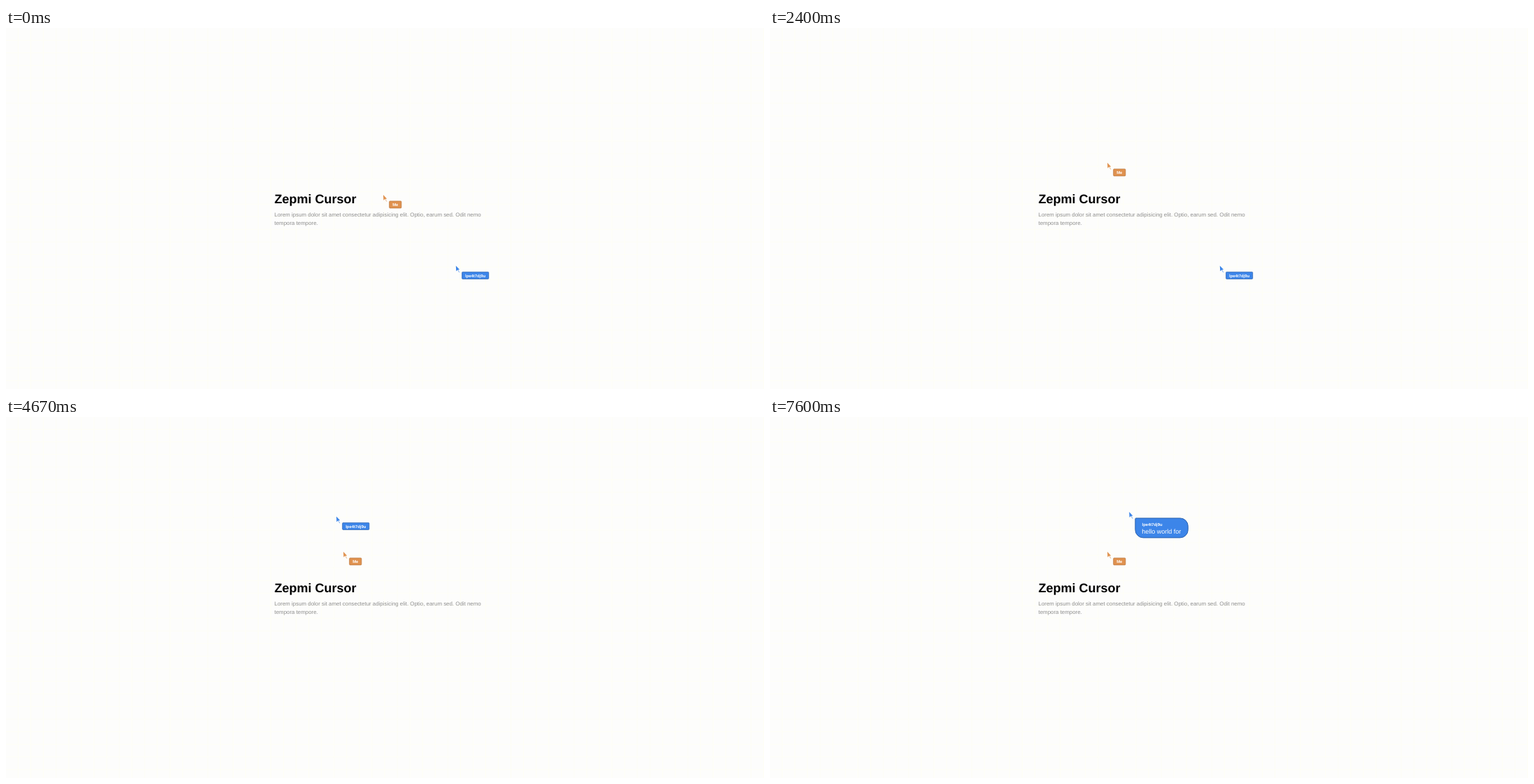
Recreate the animation shown at these times as an HTML page. Size 1083x517 px, loop 8 s.

```html
<!DOCTYPE html>
<html lang="en">
<head>
<meta charset="utf-8">
<title>Shared cursors</title>
<style>
  html, body { margin: 0; width: 100%; height: 100%; overflow: hidden; background: #fdfdfc; }
  svg { display: block; width: 1083px; height: 517px; }
  text { font-family: "Liberation Sans", Arial, sans-serif; text-rendering: geometricPrecision; white-space: pre; }
  .title { font-size: 18px; font-weight: 700; fill: #000; }
  .body { font-size: 7.9px; fill: #8f8f8f; }
  .name { font-size: 5.9px; font-weight: 700; fill: #fff; }
  .msg { font-size: 9.02px; fill: #fff; }
</style>
</head>
<body>
<svg viewBox="0 0 1083 517">
  <defs>
    <pattern id="grid" width="18.05" height="18.05" patternUnits="userSpaceOnUse">
      <path d="M0 17.5H18.05M17.5 0V18.05" stroke="#fefef5" fill="none"/>
    </pattern>
  </defs>
  <rect width="1083" height="517" fill="#fdfdfc"/>
  <rect width="1083" height="517" fill="url(#grid)"/>
  <text class="title" x="383.5" y="251.4">Zepmi Cursor</text>
  <text class="body" x="383.5" y="269.8">Lorem ipsum dolor sit amet consectetur adipisicing elit. Optio, earum sed. Odit nemo</text>
  <text class="body" x="383.5" y="281.6">tempora tempore.</text>
  <g id="cursors"></g>
</svg>
<script>
const LOOP = 8000;
const NS = 'http://www.w3.org/2000/svg';
const OPEN_AT = 5750, OPEN_FOR = 180, KEY_GAP = 85;

const lerp = (a, b, k) => a + (b - a) * k;
const clamp = v => Math.max(0, Math.min(1, v));
const progress = (t, start, end) => clamp((t - start) / (end - start));
const easeOut = (k, power) => 1 - (1 - k) ** power;
const curve = (a, b, c, k) => lerp(lerp(a, b, k), lerp(b, c, k), k);

// A cursor rests at home, then glides along each bend to the next stop.
const me = makeCursor('Me', '#e0924f', '#b87439', {
  home: [539, 239],
  moves: [
    { start: 50, end: 1070, bend: [495, 110], to: [469.5, 184.5] },
    { start: 1070, end: 1430, bend: [473, 192], to: [482, 193] }
  ]
});
const guest = makeCursor('lpe4t7dj9u', '#3c85e9', '#285fae', {
  home: [642.8, 340.5],
  moves: [
    { start: 2800, end: 3430, bend: [603, 190], to: [528, 142.5] },
    { start: 3610, end: 4670, bend: [491.6, 139.6], to: [472, 142.5] },
    { start: 4800, end: 5000, bend: [490, 139], to: [513.2, 136] }
  ]
});
const words = [
  { at: 5870, text: 'hello' },
  { at: 6350, text: ' world' },
  { at: 7330, text: ' for' }
];

function add(parent, tag, attrs) {
  const el = document.createElementNS(NS, tag);
  for (const key in attrs) el.setAttribute(key, attrs[key]);
  return parent.appendChild(el);
}

function makeCursor(label, fill, edge, path) {
  const root = add(document.getElementById('cursors'), 'g', {});
  add(root, 'path', { d: 'M0 0L.4 7.7 2.3 6 5.2 5.4Z', fill });
  add(root, 'path', { d: 'M2.7 5.6L4.9 9.6', stroke: fill, 'stroke-opacity': .65 });
  const tag = add(root, 'g', { transform: 'translate(8.7 8.9)' });
  const box = add(tag, 'path', { fill, stroke: edge });
  const name = add(tag, 'text', { class: 'name' });
  name.textContent = label;
  const msg = add(tag, 'text', { class: 'msg', x: 9.3, y: 22.2 });
  return { root, box, name, msg, path, nameWidth: name.getComputedTextLength() };
}

function place({ home, moves }, t) {
  let from = home;
  for (const { start, end, bend, to } of moves) {
    if (t < start) break;
    const k = easeOut(progress(t, start, end), 2);
    if (k < 1) return from.map((v, i) => curve(v, bend[i], to[i], k));
    from = to;
  }
  return from;
}

// Box with a nearly square top-left corner and radius r elsewhere.
function boxPath(w, h, r) {
  return `M1 0H${w - r}A${r} ${r} 0 0 1 ${w} ${r}V${h - r}A${r} ${r} 0 0 1 ${w - r} ${h}`
    + `H${r}A${r} ${r} 0 0 1 0 ${h - r}V1A1 1 0 0 1 1 0Z`;
}

function drawCursor(c, t, open, message) {
  c.root.setAttribute('transform', `translate(${place(c.path, t)})`);
  if (c.msg.textContent !== message) c.msg.textContent = message;
  const textWidth = Math.max(c.nameWidth, message ? c.msg.getComputedTextLength() : 0);
  const pad = lerp(4.5, 9.6, open);
  c.box.setAttribute('d', boxPath(textWidth + pad * 2, lerp(10, 28, open), lerp(1, 11.3, open)));
  c.box.setAttribute('stroke-width', lerp(.7, 1, open));
  c.name.setAttribute('x', pad);
  c.name.setAttribute('y', lerp(7.2, 11.5, open));
}

function typedAt(t) {
  return words.map(({ at, text }) =>
    text.slice(0, Math.max(0, Math.floor((t - at) / KEY_GAP) + 1))).join('');
}

function render(t) {
  const open = easeOut(progress(t, OPEN_AT, OPEN_AT + OPEN_FOR), 3);
  drawCursor(guest, t, open, typedAt(t));
  drawCursor(me, t, 0, '');
}

const start = performance.now();
function tick(now) {
  render(Math.max(0, now - start) % LOOP);
  requestAnimationFrame(tick);
}
render(0);
requestAnimationFrame(tick);
</script>
</body>
</html>
```
